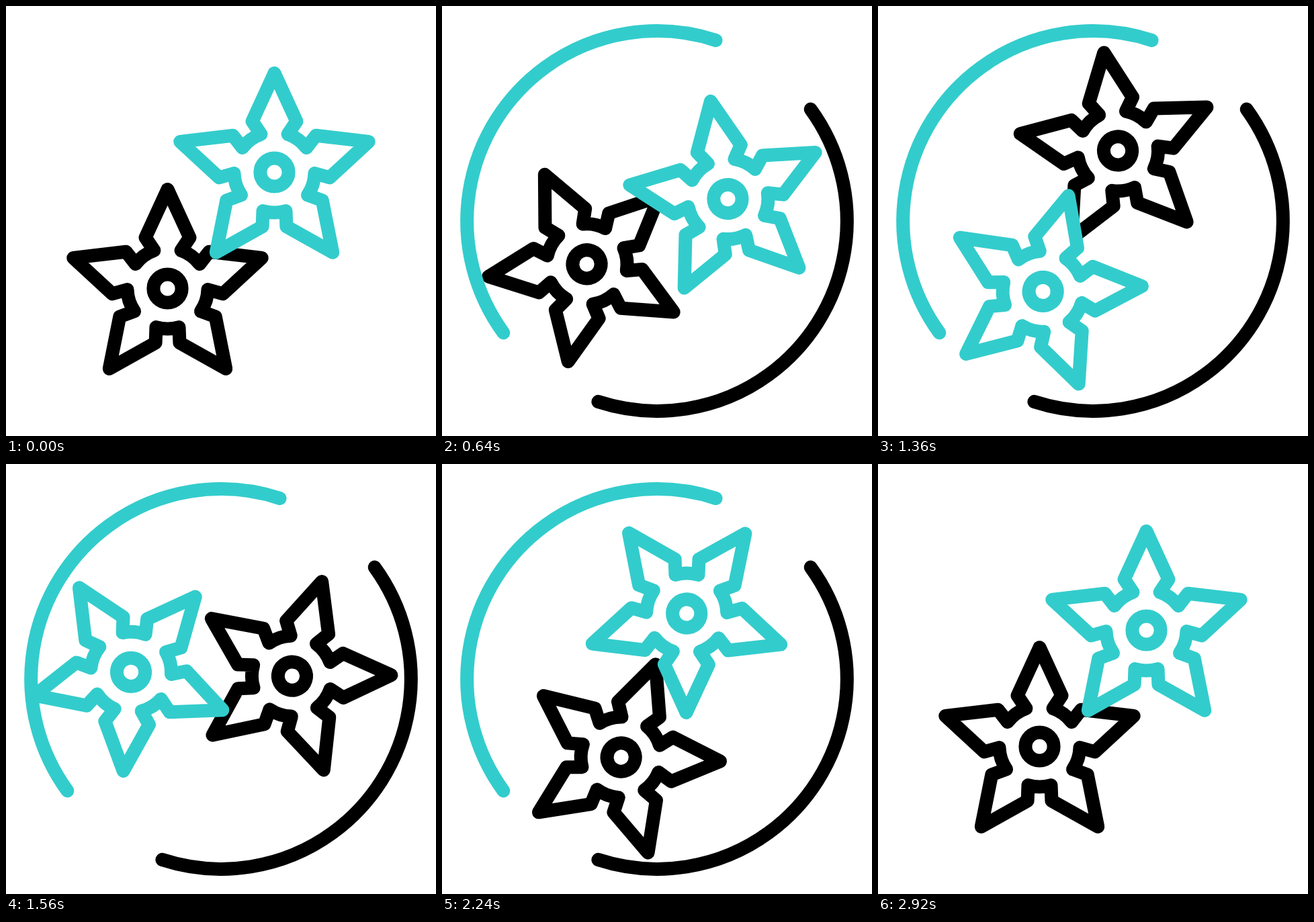
An HTML page with a canvas that plays this animation: 640x640 px, repeating every 3000 ms.

```html
<!DOCTYPE html>
<html lang="en">
<head>
<meta charset="utf-8">
<title>Throwing stars</title>
<style>
html, body { margin: 0; width: 100%; height: 100%; overflow: hidden; background: #fff; }
canvas { display: block; width: 640px; height: 640px; }
</style>
</head>
<body>
<canvas id="stage" width="640" height="640"></canvas>
<script>
const ctx = document.getElementById("stage").getContext("2d");
const TEAL = "#33cccc", BLACK = "#000", WHITE = "#fff";
const LOOP = 3000, STEP = 40, TURN = Math.PI * 2;
const PIVOT = 312, SPIN = 2800, LAG = 120, DRAW = 560;

const rad = deg => deg * Math.PI / 180;
const clamp = x => Math.min(1, Math.max(0, x));
const smooth = x => x * x * (3 - 2 * x);

// cubic-bezier(a, 0, b, 1)
function ease(x, a, b) {
  let lo = 0, hi = 1;
  for (let i = 0; i < 30; i++) {
    const s = (lo + hi) / 2, r = 1 - s;
    const bx = 3 * a * s * r * r + 3 * b * s * s * r + s * s * s;
    if (bx < x) lo = s; else hi = s;
  }
  return smooth((lo + hi) / 2);
}

// Five-armed blade around its hub
function bladePath() {
  const path = new Path2D(), rim = 60, gap = rad(19.5);
  const put = (r, a) => path.lineTo(r * Math.sin(a), -r * Math.cos(a));
  for (let i = 0; i < 5; i++) {
    const a = i * TURN / 5, up = a - TURN / 4;
    put(rim, a - gap);
    put(82.7, a - rad(23.5));
    put(147.5, a);
    put(82.7, a + rad(23.5));
    put(rim, a + gap);
    path.arc(0, 0, rim, up + gap, up + TURN / 5 - gap);
  }
  path.closePath();
  return path;
}

const blade = bladePath();
const hub = new Path2D();
hub.arc(0, 0, 21.1, 0, TURN);

function star(color, x, y, orbit, spin) {
  ctx.save();
  ctx.translate(PIVOT, PIVOT);
  ctx.rotate(orbit);
  ctx.translate(x - PIVOT, y - PIVOT);
  ctx.rotate(-spin);
  ctx.translate(0, 14);
  ctx.fillStyle = WHITE;
  ctx.strokeStyle = color;
  ctx.fill(blade);
  ctx.stroke(blade);
  ctx.stroke(hub);
  ctx.restore();
}

function swoosh(color, from, head, tail) {
  if (head - tail < 0.001) return;
  const at = p => rad(from + 144.1 * p);
  ctx.strokeStyle = color;
  ctx.beginPath();
  ctx.arc(320, 320, 282.8, at(tail), at(head));
  ctx.stroke();
}

function draw(t) {
  ctx.fillStyle = WHITE;
  ctx.fillRect(0, 0, 640, 640);
  ctx.lineWidth = 20;
  ctx.lineCap = ctx.lineJoin = "round";

  const orbit = TURN * ease(clamp(t / SPIN), 0.612, 0.396);
  const spin = delay => TURN * smooth(clamp((t - delay) / SPIN));
  star(BLACK, 240.5, 406.5, orbit, spin(0));
  star(TEAL, 399.5, 233.5, orbit, spin(LAG));

  const head = smooth(clamp(t / DRAW));
  const tail = smooth(clamp((t - SPIN + DRAW) / DRAW));
  swoosh(TEAL, 143.95, head, tail);
  swoosh(BLACK, -36.05, head, tail);
}

const start = performance.now();
function tick() {
  const t = (performance.now() - start) % LOOP;
  draw(Math.floor(t / STEP) * STEP);
  requestAnimationFrame(tick);
}
tick();
</script>
</body>
</html>
```
